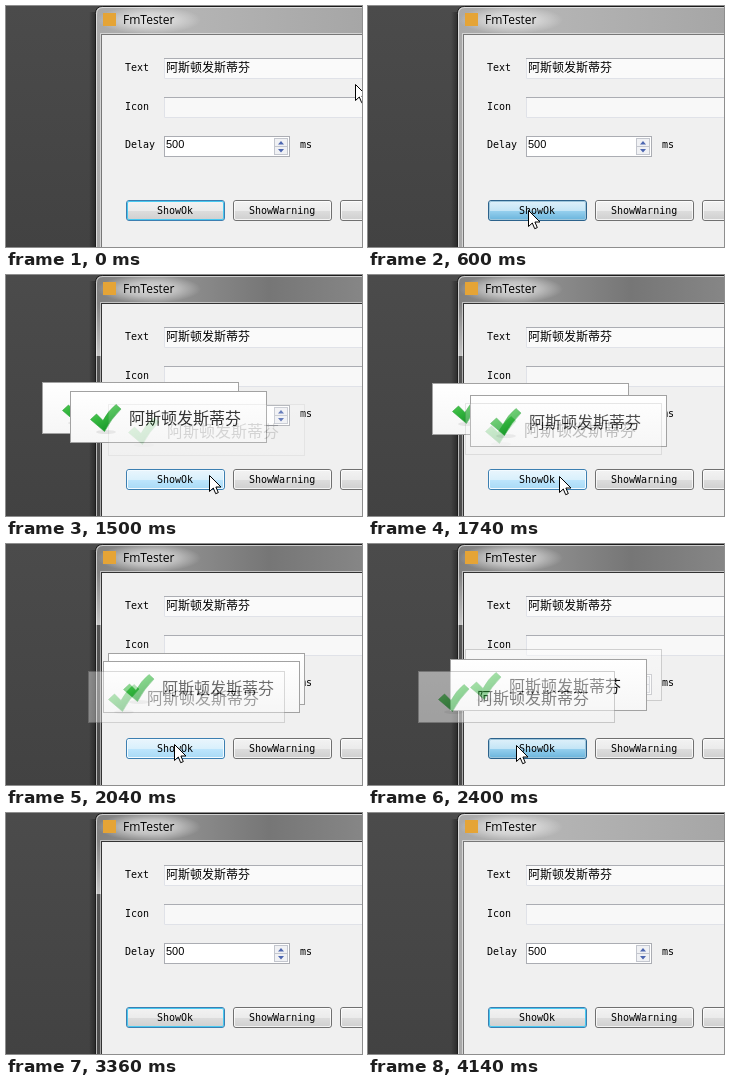
Recreate the animation shown at these times as an HTML page. Size 356 px wide and 241 px high, loop 4.26 s.

```html
<!DOCTYPE html>
<html lang="zh-CN">
<head>
<meta charset="utf-8">
<title>FmTester</title>
<style>
  html, body { margin: 0; width: 100%; height: 100%; overflow: hidden; background: #474747; }
  svg { display: block; width: 100vw; height: 100vh; }
  text { white-space: pre; }
  .mono { font: 10px "DejaVu Sans Mono", monospace; fill: #000; }
  .num { font: 11px "Liberation Sans", sans-serif; }
  .title { font: 12px "Open Sans", sans-serif; }
  .cjk { font: 12px "Noto Sans CJK SC", "Noto Sans CJK", sans-serif; }
  .toast text { font: 16px "Noto Sans CJK SC", "Noto Sans CJK", sans-serif; fill: #111; }
</style>
</head>
<body>
<svg viewBox="0 0 356 241">
  <defs>
    <linearGradient id="desk" x2="0" y2="1">
      <stop stop-color="#4b4b4b"/><stop offset="1" stop-color="#424242"/>
    </linearGradient>
    <linearGradient id="idleBar">
      <stop stop-color="#a9a9a9"/><stop offset=".35" stop-color="#b4b4b4"/><stop offset="1" stop-color="#a6a6a6"/>
    </linearGradient>
    <linearGradient id="activeBar">
      <stop stop-color="#808080"/><stop offset=".25" stop-color="#949494"/>
      <stop offset=".65" stop-color="#767676"/><stop offset="1" stop-color="#868686"/>
    </linearGradient>
    <linearGradient id="sideGlass" x2="0" y2="1">
      <stop stop-color="#808080"/><stop offset=".25" stop-color="#c4c4c4"/>
      <stop offset=".25" stop-color="#555"/><stop offset="1" stop-color="#4c4c4c"/>
    </linearGradient>
    <radialGradient id="glow">
      <stop stop-color="#fff" stop-opacity=".65"/><stop offset=".5" stop-color="#fff" stop-opacity=".45"/>
      <stop offset="1" stop-color="#fff" stop-opacity="0"/>
    </radialGradient>
    <linearGradient id="shade">
      <stop stop-color="#000" stop-opacity="0"/><stop offset="1" stop-color="#000" stop-opacity=".4"/>
    </linearGradient>
    <linearGradient id="plain" x2="0" y2="1">
      <stop stop-color="#f3f3f3"/><stop offset=".5" stop-color="#ebebeb"/>
      <stop offset=".5" stop-color="#dddddd"/><stop offset="1" stop-color="#cfcfcf"/>
    </linearGradient>
    <linearGradient id="hover" x2="0" y2="1">
      <stop stop-color="#eaf6fd"/><stop offset=".5" stop-color="#d9f0fc"/>
      <stop offset=".5" stop-color="#bee6fd"/><stop offset="1" stop-color="#a7d9f5"/>
    </linearGradient>
    <linearGradient id="press" x2="0" y2="1">
      <stop stop-color="#e0f1fa"/><stop offset=".5" stop-color="#c4e5f6"/>
      <stop offset=".5" stop-color="#98d1ef"/><stop offset="1" stop-color="#68b3db"/>
    </linearGradient>
    <linearGradient id="paper" x2="0" y2="1">
      <stop stop-color="#fff"/><stop offset="1" stop-color="#f6f6f6"/>
    </linearGradient>
    <linearGradient id="green" x2=".6" y2="1">
      <stop stop-color="#72d86a"/><stop offset=".5" stop-color="#35b83f"/><stop offset="1" stop-color="#159328"/>
    </linearGradient>
    <g id="field">
      <path d="M0 .5H250" stroke="#abadb3"/><path d="M.5 1V20.5H250" fill="none" stroke="#e0e2e8"/>
    </g>
    <g id="button">
      <rect x=".5" y=".5" width="98" height="20" rx="2.5" fill="url(#plain)" stroke="#707070"/>
      <rect x="1.5" y="1.5" width="96" height="18" rx="1.5" fill="none" stroke="#fff" stroke-opacity=".75"/>
    </g>
  </defs>

  <rect width="356" height="241" fill="url(#desk)"/>
  <rect x="83" y="6" width="7" height="235" fill="url(#shade)"/>

  <path id="frame" d="M89.5 242V7.5Q89.5.5 96.5.5H357V242Z" stroke="#1c1c1c"/>
  <rect id="side" x="90" y="28" width="6" height="213" fill="url(#sideGlass)"/>
  <path d="M90.5 241V8Q90.5 1.5 97 1.5H356" fill="none" stroke="#fff" stroke-opacity=".6"/>
  <ellipse cx="143" cy="14" rx="52" ry="14" fill="url(#glow)"/>
  <rect x="97" y="7" width="13" height="13" fill="#e5a436"/>
  <text class="title" x="117" y="18">FmTester</text>
  <path d="M94.5 241V27.5H356" fill="none" stroke="#fff" stroke-opacity=".5"/>
  <rect id="client" x="95.5" y="28.5" width="262" height="215" fill="#f0f0f0"/>

  <g class="mono">
    <text x="119" y="65">Text</text>
    <text x="119" y="104">Icon</text>
    <text x="119" y="142">Delay</text>
    <text x="294" y="142">ms</text>
  </g>
  <rect x="158" y="52" width="198" height="21" fill="#fafafa"/>
  <use href="#field" x="158" y="52"/>
  <text class="cjk" x="160" y="66">阿斯顿发斯蒂芬</text>
  <rect x="158" y="91" width="198" height="21" fill="#f8f8f8"/>
  <use href="#field" x="158" y="91"/>

  <rect x="158.5" y="130.5" width="125" height="20" fill="#fff" stroke="#abadb3"/>
  <text class="num" x="160" y="142">500</text>
  <g fill="#f0f1f4" stroke="#c3c6ce">
    <rect x="268.5" y="132.5" width="13" height="8"/><rect x="268.5" y="140.5" width="13" height="8"/>
  </g>
  <path d="M272 138.5L275 135l3 3.5ZM272 143l3 3.5 3-3.5Z" fill="#4c66b0"/>

  <use href="#button" x="227" y="194"/>
  <use href="#button" x="334" y="194"/>
  <rect id="okFace" x="120.5" y="194.5" width="98" height="20" rx="2.5"/>
  <rect id="okRing" x="121.5" y="195.5" width="96" height="18" rx="1.5" fill="none"/>
  <g class="mono">
    <text x="151" y="208">ShowOk</text>
    <text x="243" y="208">ShowWarning</text>
  </g>

  <g id="toasts"></g>
  <path id="cursor" d="M.5.5V16.5L4.3 13 6.7 18.7 9.3 17.6 6.9 12H12Z" fill="#fff" stroke="#000"/>
</svg>

<script>
  const LOOP = 4260, STEP = 60;
  const FOCUS_IN = 660, FOCUS_OUT = 4140, CURSOR_OUT = 3360;
  const LIFE = 785, FADE_OUT = 100, PRESS = 125, RISE = 0.0357;

  // Each click: time the toast appears and its left edge.
  const clicks = [[710, 60], [825, 36], [1085, 64], [1436, 102],
                  [1660, 97], [1938, 82], [2278, 50], [2524, 50]];

  // Pointer stops: time, x, y.
  const stops = [
    [0, 349, 78], [240, 240, 165], [420, 174, 208], [480, 162, 206], [700, 158, 202],
    [820, 134, 201], [960, 147, 200], [1080, 162, 201], [1450, 200, 200], [1500, 203, 200],
    [1665, 195, 201], [1930, 180, 202], [2040, 168, 200], [2300, 148, 201], [2520, 148, 202],
    [2940, 164, 204], [3060, 205, 190], [3240, 325, 140], [3360, 360, 120]
  ];

  const buttonLooks = {
    plain: { stroke: "#3c7fb1", ring: "#48c8f0" },
    hover: { stroke: "#3c7fb1", ring: "#f2faff" },
    press: { stroke: "#2c628b", ring: "#9dc6dc" }
  };

  const el = id => document.getElementById(id);
  const clamp = v => Math.max(0, Math.min(1, v));

  const toasts = clicks.map(([start, x]) => {
    const node = document.createElementNS("http://www.w3.org/2000/svg", "g");
    node.setAttribute("class", "toast");
    node.innerHTML = `
      <rect x=".5" y=".5" width="196" height="51" fill="url(#paper)" stroke="#a2a2a2"/>
      <ellipse cx="36" cy="41" rx="10" ry="2" fill="#000" opacity=".08"/>
      <path d="M20.5 28.5L26.5 23 33 29.5Q38 20 46 13.5L51 18Q41 28 34.5 40.5Z"
        fill="url(#green)" stroke="#2ba23a" stroke-width=".6"/>
      <text x="59" y="33">阿斯顿发斯蒂芬</text>`;
    el("toasts").append(node);
    return { node, start, x };
  });

  function pointerAt(t) {
    const i = stops.findIndex(s => s[0] > t);
    const [t0, x0, y0] = stops[i - 1], [t1, x1, y1] = stops[i];
    const k = (t - t0) / (t1 - t0);
    return [Math.round(x0 + (x1 - x0) * k), Math.round(y0 + (y1 - y0) * k)];
  }

  function drawPointer(t) {
    const [x, y] = t < CURSOR_OUT ? pointerAt(t) : [400, 0];
    el("cursor").setAttribute("transform", `translate(${x} ${y})`);
    const over = x >= 120 && x < 219 && y >= 194 && y < 215;
    const pressed = over && clicks.some(([start]) => t < start && t >= start - PRESS);
    const state = pressed ? "press" : over ? "hover" : "plain";
    el("okFace").setAttribute("fill", `url(#${state})`);
    el("okFace").setAttribute("stroke", buttonLooks[state].stroke);
    el("okRing").setAttribute("stroke", buttonLooks[state].ring);
  }

  function drawToast({ node, start, x }, t) {
    const age = t - start;
    const alpha = Math.min(clamp((age - 40) / 160), clamp((LIFE - age) / FADE_OUT));
    node.setAttribute("opacity", alpha);
    node.setAttribute("transform", `translate(${x} ${Math.round(131 - age * RISE)})`);
  }

  function render(now) {
    const t = Math.min(Math.floor(now % LOOP / STEP) * STEP, FOCUS_OUT);
    const active = t >= FOCUS_IN && t < FOCUS_OUT;
    el("frame").setAttribute("fill", `url(#${active ? "activeBar" : "idleBar"})`);
    el("side").setAttribute("opacity", active ? 1 : 0);
    el("client").setAttribute("stroke", active ? "#333" : "#777");
    drawPointer(t);
    toasts.forEach(toast => drawToast(toast, t));
  }

  const origin = performance.now();
  (function tick() {
    render(performance.now() - origin);
    requestAnimationFrame(tick);
  })();
</script>
</body>
</html>
```
